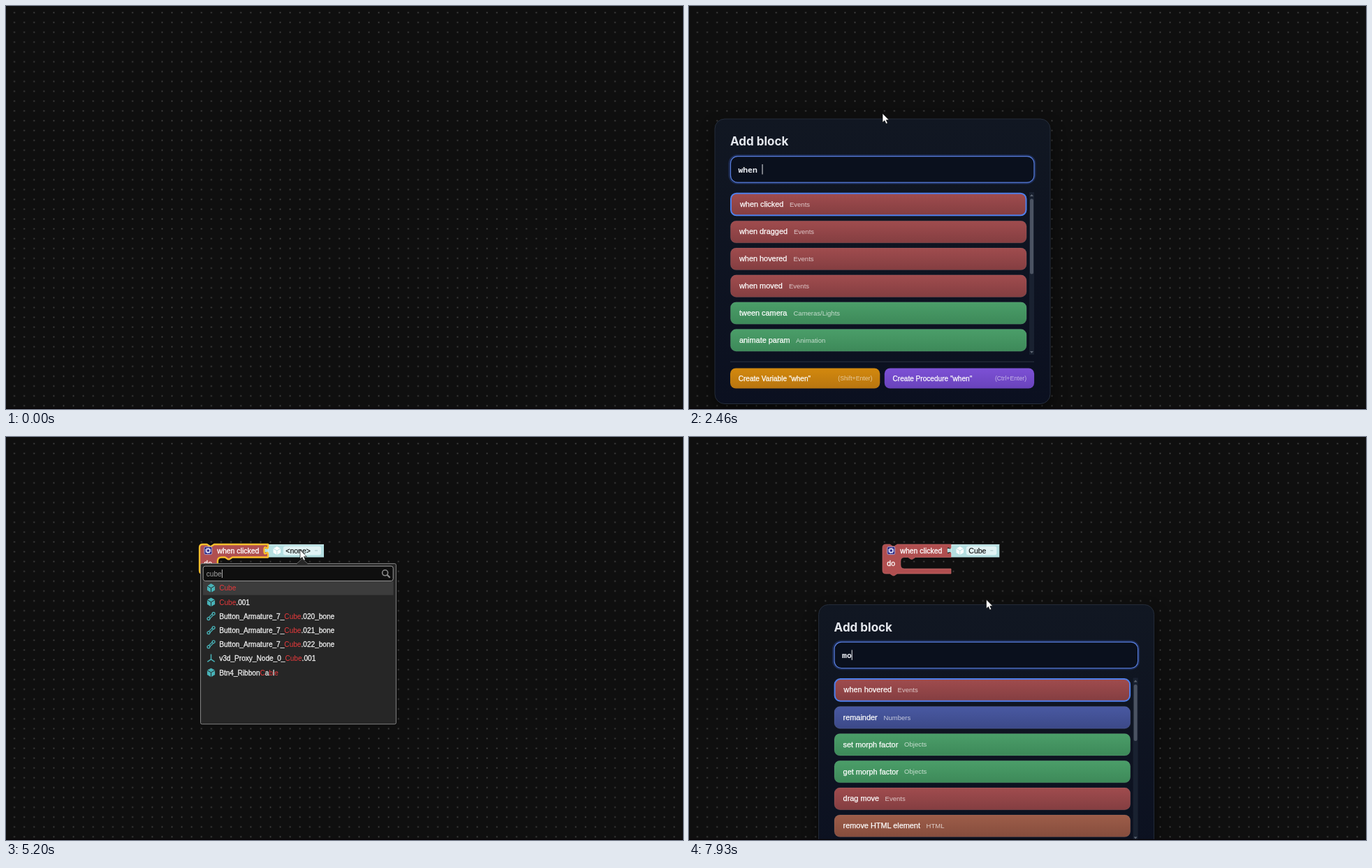
An HTML page for the animation above (8000 ms loop, 969 px wide and 578 px high).

```html
<!DOCTYPE html>
<html lang="en">
<head>
<meta charset="utf-8">
<title>Block editor</title>
<style>
html, body { margin: 0; width: 100%; height: 100%; overflow: hidden; background: #0f0f0f; }
svg { display: block; width: 969px; height: 578px; font-family: "Liberation Sans", Arial, sans-serif; }
text { white-space: pre; }
.title { font: 700 17px Inter, sans-serif; fill: #e5e8ee; }
.mono { font: 11.35px "Noto Sans Mono", monospace; fill: #70757e; }
.typed { font-weight: 700; fill: #e8ebf1; }
.row { font-size: 10.9px; fill: #fff; stroke: #fff; stroke-width: .25px; }
.cat { font-size: 9.5px; fill: #fff; fill-opacity: .7; }
.btn { font-size: 10.1px; fill: #fff; stroke: #fff; stroke-width: .25px; }
.hint { font-size: 8.7px; fill: #fff; fill-opacity: .6; text-anchor: end; }
.label { font-size: 10.5px; fill: #fff; stroke: #fff; stroke-width: .3px; }
.value { font-size: 10.5px; fill: #111; stroke: #111; stroke-width: .15px; }
.item { font-size: 10.1px; fill: #eee; stroke: #eee; stroke-width: .3px; }
.hit { fill: #e8393b; stroke: none; }
</style>
</head>
<body>
<svg viewBox="0 0 969 578">
  <defs id="defs">
    <pattern id="dots" x="4.95" y="2.45" width="14.095" height="14.095" patternUnits="userSpaceOnUse">
      <rect x="6.2" y="6.2" width="1.7" height="1.7" fill="#4a4a4a"/>
    </pattern>
    <filter id="soft" x="-20%" y="-40%" width="140%" height="180%"><feGaussianBlur stdDeviation="11"/></filter>
  </defs>
  <rect width="969" height="578" fill="#0f0f0f"/>
  <rect width="969" height="578" fill="url(#dots)"/>
  <g id="scene"></g>
  <path id="cursor" d="M0 0V13L3 10.4 5.1 15 7.3 14 5.3 9.6H9.3Z" fill="#fff" stroke="#111" stroke-width=".7"/>
  <rect y="576.8" width="969" height="1.2" fill="#060306"/>
</svg>
<script>
const LOOP = 8000;
const $ = id => document.getElementById(id);
const clamp = v => Math.max(0, Math.min(1, v));
const esc = s => s.replace(/&/g, '&amp;').replace(/</g, '&lt;').replace(/>/g, '&gt;');
const text = (x, y, cls, s) => `<text x="${x}" y="${y}" class="${cls}">${esc(s)}</text>`;
const box = (x, y, w, h, r, fill, more = '') =>
  `<rect x="${x}" y="${y}" width="${w}" height="${h}" rx="${r}" fill="${fill}" ${more}/>`;

const shades = {
  panel: ['#111722', '#0b1020'],
  red: ['#a04c4e', '#843e41'],
  green: ['#4b9e69', '#3d8959'],
  blue: ['#4959a2', '#3c4988'],
  brown: ['#9d5d49', '#864d3d'],
  orange: ['#d3890e', '#b87510'],
  purple: ['#7d51d6', '#6943bb']
};
for (const [id, [a, b]] of Object.entries(shades))
  $('defs').insertAdjacentHTML('beforeend', `<linearGradient id="${id}" x2="0" y2="1">
    <stop stop-color="${a}"/><stop offset="1" stop-color="${b}"/></linearGradient>`);

// Block search panel
const whenRows = [
  ['when clicked', 'Events', 'red', 144], ['when dragged', 'Events', 'red', 150],
  ['when hovered', 'Events', 'red', 149.5], ['when moved', 'Events', 'red', 143],
  ['tween camera', 'Cameras/Lights', 'green', 149.5], ['animate param', 'Animation', 'green', 153]
];
const moveRows = [
  ['when hovered', 'Events', 'red', 150], ['remainder', 'Numbers', 'blue', 130],
  ['set morph factor', 'Objects', 'green', 159.5], ['get morph factor', 'Objects', 'green', 159.5],
  ['drag move', 'Events', 'red', 132], ['remove HTML element', 'HTML', 'brown', 191]
];

function resultRow([name, cat, color, catX], i, w) {
  const y = 268.9 + i * 38.85, on = i === 0;
  const edge = on ? 'stroke="#4f7fea" stroke-width="2"' : 'stroke="#fff" stroke-opacity=".1" stroke-width=".8"';
  const d = on ? 1 : .4;
  return box(59 + d, y + d - (on ? 1.2 : 0), w - 2 * d, 32.4 - 2 * d + (on ? 1.2 : 0), 8, `url(#${color})`, edge) +
    text(on ? 73 : 72, y + 19.7 - (on ? .6 : 0), 'row', name) +
    text(catX, y + 19.4 - (on ? .6 : 0), 'cat', cat);
}

function scrollbar(thumb) {
  return box(487, 267, 7, 233, 0, '#192130') + box(488, 276.5, 5, thumb, 2.5, '#4b5362') +
    '<path d="M488 273h5l-2.5-3zM488 495h5l-2.5 3z" fill="#5d6573"/>';
}

function button(x, color, label, hint) {
  return box(x, 519.5, 214.3, 29, 8, `url(#${color})`) +
    text(x + 11.7, 537.6, 'btn', label) + text(x + 203.3, 537, 'hint', hint);
}

function panel({ x, y, query, caret, focus, rows, thumb }) {
  const cut = rows ? (6 - rows.length) * 39 : 0;
  const h = rows ? 409 - cut : 128;
  const mix = (a, b) => Math.round(a + (b - a) * focus);
  const border = `rgb(${mix(36, 88)},${mix(54, 126)},${mix(105, 222)})`;
  let s = box(37, 172, 480, h, 14, '#000', 'opacity=".5" filter="url(#soft)"') +
    box(37, 162, 480, h - .5, 14, 'url(#panel)', 'stroke="#252d3b" stroke-width="1"') +
    text(59, 200.4, 'title', 'Add block') +
    box(58, 214.5, 437, 39.5, 11.5, 'none', 'stroke="#3c62c8" stroke-opacity=".3" stroke-width="3"') +
    box(59.5, 215.7, 434.5, 37.4, 10, '#0a101d', `stroke="${border}" stroke-width="1.2"`) +
    text(70.5, 239, query ? 'mono typed' : 'mono', query || 'Search for blocks...');
  if (caret) s += box(70.5 + query.length * 6.81, 227, 1, 14.5, 0, '#e4e6ea');
  if (rows) {
    const q = query.trim();
    s += rows.map((r, i) => resultRow(r, i, thumb ? 424.5 : 435)).join('');
    if (thumb) s += scrollbar(thumb);
    s += `<g transform="translate(0 ${-cut})">` + box(59, 509.7, 435, 1, 0, '#2b3240') +
      button(59, 'orange', `Create Variable "${q}"`, '(Shift+Enter)') +
      button(279.8, 'purple', `Create Procedure "${q}"`, '(Ctrl+Enter)') + '</g>';
  }
  return `<g transform="translate(${x} ${y})">${s}</g>`;
}

// Event block with its value
const cubeIcon = (x, y, r, fill, line) => {
  const a = r * .87, b = r / 2;
  return `<g transform="translate(${x} ${y})"><path d="M0 ${-r}L${a} ${-b}V${b}L0 ${r}L${-a} ${b}V${-b}Z" fill="${fill}"/>
    <path d="M${-a} ${-b}L0 0L${a} ${-b}M0 0V${r}" fill="none" stroke="${line}" stroke-width="1"/></g>`;
};
const TAB = 'c0 7-5.6-5.6-5.6 5.25s5.6-1.75 5.6 5.25';
const BODY = 'M277 158.5q0-4.5 4.5-4.5H287.5l4.2 2.8h2.1l4.2-2.8H375v3.5' + TAB +
  'V172.5H324l-4.2 2.8h-2.1l-4.2-2.8H308.5q-5.6 0-5.6 5.6V183.4q0 5.6 5.6 5.6H375V196H298l-4.2 2.8h-2.1l-4.2-2.8H281.5q-4.5 0-4.5-4.5Z';

function block(value, selected) {
  const right = value === 'Cube' ? 444.3 : 455;
  const edge = selected ? 'stroke="#fdbf2d" stroke-width="2.3"' : 'stroke="#c46b6b" stroke-width=".7"';
  return `<path d="M375 154H${right}V172.5H375V168c0-7-5.6 1.75-5.6-5.25s5.6 1.75 5.6-5.25Z" fill="#b5dfe1"/>
    <path d="M375.4 172V154.4H${right}" fill="none" stroke="#d3eeef" stroke-width=".8"/>
    <path d="${BODY}" fill="#b04f50" ${edge} stroke-linejoin="round"/>` +
    box(283.8, 157.3, 11, 11.2, 2, '#34318a', 'stroke="#c0b6d4" stroke-width=".8"') +
    `<circle cx="289.3" cy="162.9" r="2.6" fill="none" stroke="#eef" stroke-width="1.3"/>
    <circle cx="289.3" cy="162.9" r="3.8" fill="none" stroke="#eef" stroke-width="1" stroke-dasharray="1.5 1.48"/>` +
    text(302.3, 166.6, 'label', 'when clicked') + text(283.3, 185.3, 'label', 'do') +
    cubeIcon(387.8, 163, 6, '#fff', '#b5dfe1') +
    box(396.8, 156.8, right - 400.8, 12.4, 3, '#e1f3f4') +
    text(400.3, 166.6, 'value', value) + box(right - 13, 162.4, 4, 1, 0, '#a9c4c6');
}

// Object picker
const objects = [
  ['cube', '[Cube]'], ['cube', '[Cube].001'],
  ...['020', '021', '022'].map(n => ['bone', `Button_Armature_7_[Cube].${n}_bone`]),
  ['axes', 'v3d_Proxy_Node_0_[Cube].001'], ['cube', 'Btn4_Ribbon[C]a[b]l[e]']
];
const TEAL = '#48b2b7';
const icons = {
  cube: cubeIcon(0, 0, 6.4, TEAL, '#262626'),
  bone: `<path d="M-3.2 3.2L3.2-3.2" stroke="${TEAL}" stroke-width="3.6"/>
    <path d="M-2 2L2.6-2.6" stroke="#262626" stroke-width="1.2"/>
    <g fill="#262626" stroke="${TEAL}" stroke-width="1.3"><circle cx="-3.6" cy="3.6" r="1.9"/><circle cx="3.6" cy="-3.6" r="1.9"/></g>`,
  axes: `<path d="M0-6V1.2L-5.2 4.8M0 1.2L5.2 4.8" fill="none" stroke="${TEAL}" stroke-width="1.5"/>`
};

function objectRow([icon, name], i, query) {
  const y = 216.6 + i * 20.2;
  const marked = name.replace(/\[(\w+)\]/g, (_, part) => {
    const n = [...part.toLowerCase()].filter(c => query.includes(c)).length;
    return n ? `<tspan class="hit">${part.slice(0, n)}</tspan>${part.slice(n)}` : part;
  });
  return `<g transform="translate(293.5 ${y})">${icons[icon]}</g><text x="305.2" y="${y + 3.7}" class="item">${marked}</text>`;
}

function picker(query, open) {
  const caretX = 287 + (query ? query.length * 5.6 - .5 : 0);
  return `<g opacity="${open}" transform="translate(0 ${-14 * (1 - open)})">` +
    box(279, 185, 280, 229, 3, '#000', 'opacity=".35"') +
    box(278.5, 181.6, 279.8, 230.2, 2, '#262626', 'stroke="#858585" stroke-width="1"') +
    '<path d="M415.5 182.2L424 174.5L432.5 182.2" fill="#262626" stroke="#777" stroke-width=".8"/>' +
    box(282, 207, 272.5, 19.7, 0, '#3c3c3c') +
    box(282.2, 185.2, 272, 21.2, 3, '#0f0f0f', 'stroke="#9a9a9a" stroke-width="1"') +
    `<text x="286.8" y="199.6" font-size="10.1" fill="#a2a2a2">${query}</text>` +
    box(caretX, 190, .9, 12, 0, '#ccc') +
    '<g fill="none" stroke="#8c8c8c"><circle cx="542.6" cy="194.8" r="4" stroke-width="1.6"/><path d="M545.6 197.8L549.6 201.8" stroke-width="2.2"/></g>' +
    objects.map((o, i) => objectRow(o, i, query)).join('') + '</g>';
}

// Last entry at or before t
const at = (steps, t) => steps.reduce((v, [time, next]) => t >= time ? next : v, '');
const typing = [[2130, 'w'], [2200, 'wh'], [2270, 'whe'], [2400, 'when'], [2455, 'when '], [2600, 'when c'], [2730, 'when cl']];
const finding = [[5060, 'c'], [5130, 'cub'], [5195, 'cube']];

function scene(t) {
  if (t < 1325) return '';
  if (t < 2995) {
    const query = at(typing, t);
    const few = t >= 2725;
    return panel({
      x: 0, y: 0, query, caret: query || t < 1865, focus: clamp((t - 1330) / 200),
      rows: query && (few ? whenRows.slice(0, 5) : whenRows), thumb: few ? 0 : 108
    });
  }
  let s = block(t < 5325 ? '<none>' : 'Cube', t < 6270);
  if (t >= 4430 && t < 5325) {
    const p = clamp((t - 4430) / 270);
    s += picker(at(finding, t), 1 - (1 - p) ** 2);
  }
  if (t >= 6525) {
    const query = t >= 7925 ? 'mo' : '';
    s += panel({
      x: 148.6, y: 78.4, query, caret: query || t < 7065 || t >= 7595, focus: clamp((t - 6535) / 200),
      rows: query && moveRows, thumb: 81
    });
  }
  return s;
}

// Pointer paths: [time, x, y]
const paths = [
  [[200, 828, 536], [400, 540, 330], [570, 190, 215], [660, 136, 178], [760, 190, 154], [860, 269, 144]],
  [[1000, 278, 148]],
  [[1200, 277, 154]],
  [[3600, 277, 154], [3800, 267, 147], [4030, 335, 130], [4270, 415, 155], [4400, 421, 162]],
  [[5740, 421, 162], [5900, 446, 127], [6100, 468, 172], [6330, 425.5, 233]]
];
const spline = (a, b, c, d, u) =>
  b + u / 2 * (c - a + u * (2 * a - 5 * b + 4 * c - d + u * (3 * (b - c) + d - a)));

function pointer(t) {
  const path = paths.filter(p => t >= p[0][0] - 4).pop();
  if (!path) return null;
  const last = path.length - 1;
  if (t >= path[last][0]) return path[last].slice(1);
  const i = Math.max(0, path.findIndex(k => k[0] > t) - 1);
  const k = n => path[Math.max(0, Math.min(last, n))];
  const u = clamp((t - k(i)[0]) / (k(i + 1)[0] - k(i)[0]));
  return [1, 2].map(c => spline(k(i - 1)[c], k(i)[c], k(i + 1)[c], k(i + 2)[c], u));
}

let shown = null;
function draw(t) {
  const next = scene(t);
  if (next !== shown) $('scene').innerHTML = shown = next;
  const p = pointer(t);
  $('cursor').setAttribute('visibility', p ? 'visible' : 'hidden');
  if (p) $('cursor').setAttribute('transform', `translate(${p[0]} ${p[1]})`);
}

function tick() {
  draw(performance.now() % LOOP);
  requestAnimationFrame(tick);
}
tick();
</script>
</body>
</html>
```
